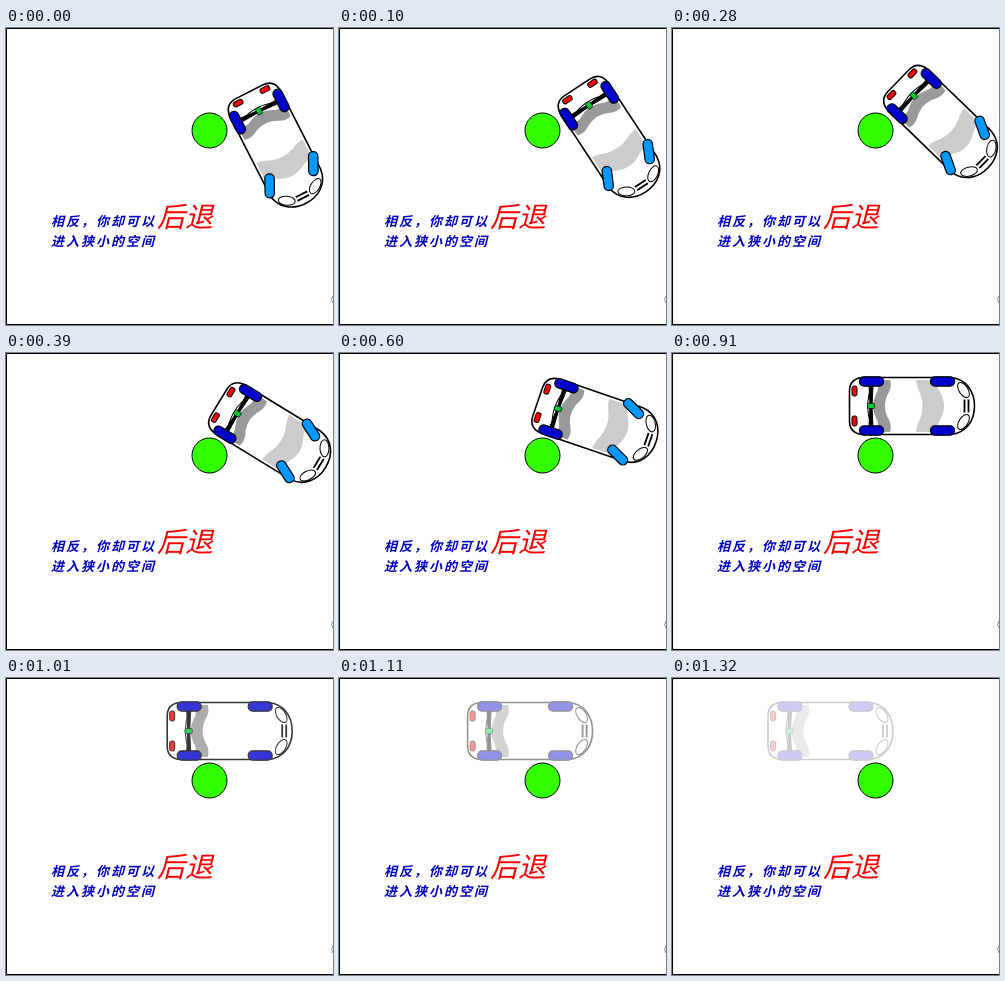
An HTML page that plays this animation: 327x297 px, repeating every 1430 ms.

```html
<!DOCTYPE html>
<html lang="zh">
<head>
<meta charset="utf-8">
<style>
html, body { margin: 0; width: 100%; height: 100%; overflow: hidden; background: #fff; }
svg { display: block; width: 327px; height: 297px; }
text { font-family: "Noto Sans CJK SC", "Noto Sans CJK", sans-serif; font-style: italic; }
.note { font-size: 13px; font-weight: 700; letter-spacing: 2px; fill: #0000c0; }
.big { font-size: 28px; font-weight: 300; fill: #f00; }
</style>
</head>
<body>
<svg viewBox="0 0 327 297">
  <defs>
    <rect id="wheel" x="-12" y="-4.7" width="24" height="9.4" rx="4.4" stroke="#000" stroke-width="1.2"/>
    <ellipse id="lamp" rx="8.5" ry="4.5" fill="#fff" stroke="#000"/>
    <rect id="tail" x="-2.5" y="-5" width="5" height="10" rx="2" fill="#f00" stroke="#000"/>
  </defs>
  <rect width="327" height="297" fill="#fff"/>
  <circle cx="203.5" cy="102.5" r="17.5" fill="#3f0" stroke="#000"/>
  <!-- origin: middle of the rear axle, nose towards +x -->
  <g id="car">
    <path d="M-9-28.5H80C95-27 103.5-15 103.5 0S95 27 80 28.5H-9Q-21.5 27-21.5 15V-15Q-21.5-27-9-28.5Z" fill="#fff" stroke="#000" stroke-width="1.6"/>
    <path d="M5-26H19Q21-20 18-14Q10 0 18 14Q21 20 19 26H5Q9 18 5 12Q-1 0 5-12Q9-18 5-26Z" fill="#999"/>
    <path id="windscreen" d="M45-26Q46-18 49-13Q54 0 49 13Q46 18 45 26H66Q65 20 69 14Q77 0 69-14Q65-20 66-26Z" fill="#ccc"/>
    <use href="#tail" x="-16.5" y="-15"/>
    <use href="#tail" x="-16.5" y="15"/>
    <path d="M-2-21H2L1 0L2 21H-2L-1 0Z" stroke="#000"/>
    <path d="M1-21Q-8 0 1 21" fill="none" stroke="#000"/>
    <rect x="-3.5" y="-2.5" width="7" height="5" rx="1" fill="#0c3" stroke="#000" stroke-width=".7"/>
    <use href="#lamp" transform="translate(92.5 -16) rotate(58)"/>
    <use href="#lamp" transform="translate(92.5 16) rotate(-58)"/>
    <path d="M93.5-6.5V6.5M97.5-6.5V6.5" stroke="#000" stroke-width="1.8"/>
    <use href="#wheel" x=".5" y="-24.5" fill="#00c"/>
    <use href="#wheel" x=".5" y="24.5" fill="#00c"/>
    <use class="front" href="#wheel"/>
    <use class="front" href="#wheel"/>
  </g>
  <text class="note" x="45" y="198">相反，你却可以</text>
  <text class="big" x="151" y="199">后退</text>
  <text class="note" x="45" y="218">进入狭小的空间</text>
  <path d="M327 .5H.5V296.5H327" fill="none" stroke="#000"/>
  <path d="M327 268Q324 271.5 327 275" fill="none" stroke="#888"/>
</svg>
<script>
const LOOP = 1430, TURN = 10, GLIDE = 5;
const car = document.getElementById("car");
const windscreen = document.getElementById("windscreen");
const front = document.querySelectorAll(".front");

// The picture holds between ticks; the car skips one step in each leg.
function stepAt(t) {
  const tick = t < 100 ? 0 : Math.floor((t + 34) / 103.9);
  return tick + (tick > 3) + (tick > 10);
}

function render(ms) {
  const step = stepAt(ms % LOOP);
  const left = Math.max(0, 1 - step / TURN);
  const glide = Math.max(0, step - TURN) / GLIDE;
  const x = 199 + 68 * left - 14 * left ** 3 - 81.5 * glide;
  const y = 53 + 30 * left ** 2;
  const steer = left > 0 ? 26 : 0;

  car.setAttribute("transform", `translate(${x} ${y}) rotate(${63 * left})`);
  car.setAttribute("opacity", 0.2 + 0.8 * (1 - glide) ** 1.4);
  windscreen.setAttribute("opacity", glide > 0 ? 0 : 1);
  front.forEach((wheel, i) => {
    wheel.setAttribute("transform", `translate(71.5 ${i ? 24.5 : -24.5}) rotate(${steer})`);
    wheel.setAttribute("fill", steer ? "#09f" : "#00c");
  });
}

const start = performance.now();
function loop() {
  render(performance.now() - start);
  requestAnimationFrame(loop);
}
loop();
</script>
</body>
</html>
```
